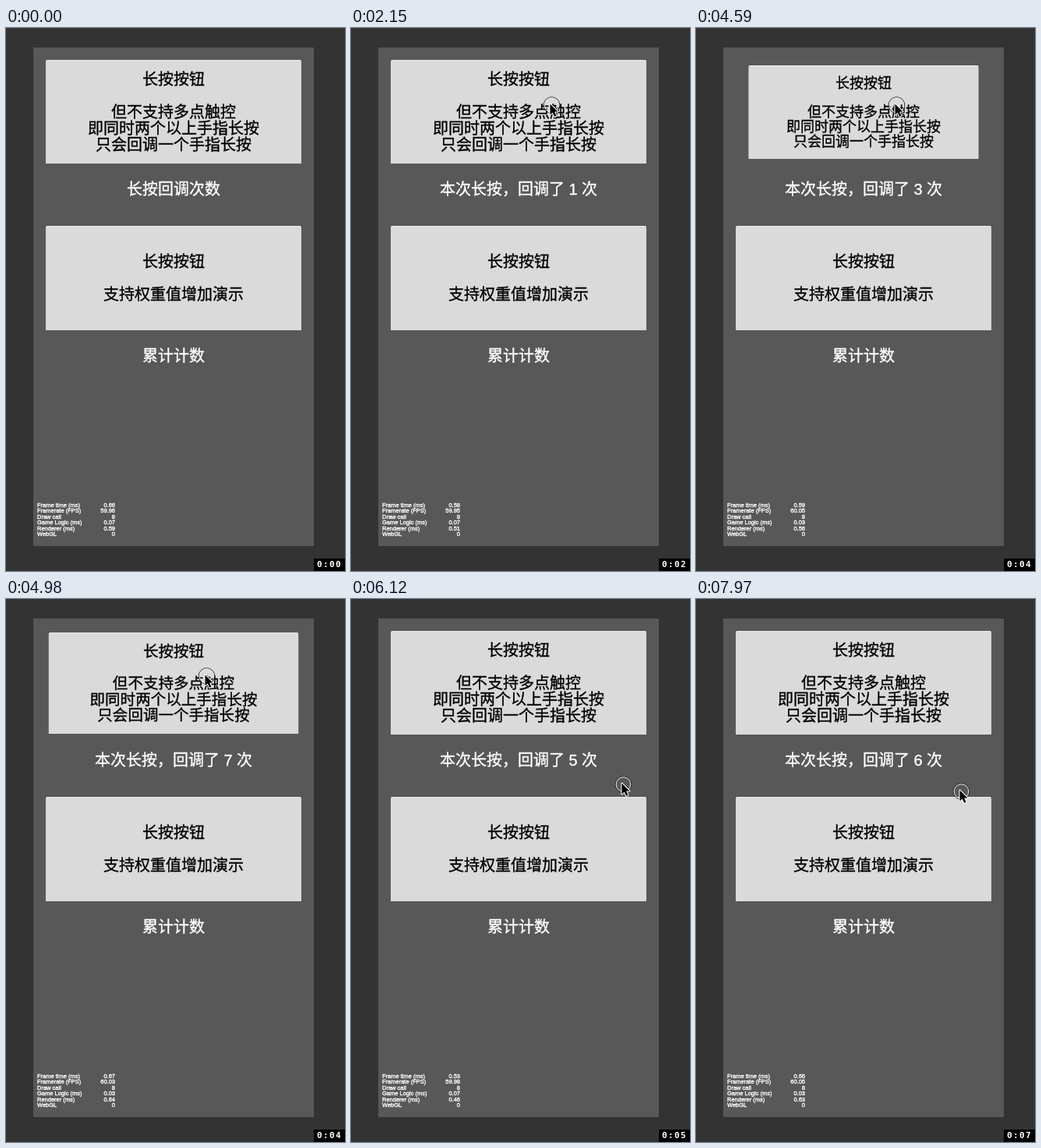
An HTML page with a canvas that plays this animation: 435x697 px, repeating every 8 s.

```html
<!DOCTYPE html>
<html lang="zh">
<head>
<meta charset="utf-8">
<title>长按按钮</title>
<style>
html, body { margin: 0; width: 100%; height: 100%; overflow: hidden; background: #333; }
canvas { display: block; width: 435px; height: 697px; }
</style>
</head>
<body>
<canvas id="stage" width="435" height="697"></canvas>
<script>
const ctx = document.getElementById('stage').getContext('2d');
const LOOP = 8000;
const SANS = '"Liberation Sans", "Noto Sans CJK SC", "Noto Sans CJK", sans-serif';
const MONO = '"DejaVu Sans Mono", monospace';

// Each hold shrinks the upper button and counts callbacks up to last.
const holds = [
  { down: 1510, up: 1750 },
  { down: 2990, up: 3490 },
  { down: 4390, up: 4904, step: 85, last: 7 },
  { down: 5230, up: 5840, step: 220, last: 5 },
  { down: 6780, up: 7153, first: 7100, step: 150, last: 6 }
];

// Pointer stops; it eases from one to the next.
const stops = [
  { at: 50, x: 396, y: 150 }, { at: 400, x: 275, y: 93 },
  { at: 1270, x: 257, y: 99 }, { at: 5680, x: 257, y: 99 },
  { at: 6120, x: 349, y: 238 }, { at: 6800, x: 335, y: 140 },
  { at: 7180, x: 335, y: 153 }, { at: 7600, x: 340, y: 247 }
];

const clamp = (v, lo = 0, hi = 1) => Math.min(hi, Math.max(lo, v));
const smooth = u => u * u * (3 - 2 * u);
const holdAt = t => holds.findLast(h => h.down <= t);

function noise(n) {
  const s = Math.sin(n * 12.9898) * 43758.5453;
  return s - Math.floor(s);
}

function text(str, x, y, color, size = 20, align = 'center') {
  ctx.font = size + 'px ' + SANS;
  ctx.textAlign = align;
  ctx.fillStyle = ctx.strokeStyle = color;
  ctx.lineWidth = 0.35;
  ctx.fillText(str, x, y);
  ctx.strokeText(str, x, y);
}

function pressScale(t) {
  const h = holdAt(t);
  if (!h) return 1;
  return 1 - 0.1 * (clamp((t - h.down) / 100) - clamp((t - h.up) / 100));
}

function callbackText(t) {
  const h = holdAt(t);
  if (!h) return '长按回调次数';
  const { first = h.down, step = 100, last = 1 } = h;
  const n = clamp(1 + Math.floor((t - first) / step), 1, last);
  return `本次长按，回调了 ${n} 次`;
}

// Lines are [text, offset of the glyph middle from the button centre].
function button(cy, h, scale, lines) {
  const w = 328 * scale;
  const top = Math.round(cy - h * scale / 2);
  const bottom = Math.round(cy + h * scale / 2);
  ctx.beginPath();
  ctx.roundRect(215 - w / 2, top, w, bottom - top, [2, 2, 0.5, 0.5]);
  ctx.fillStyle = '#dadada';
  ctx.fill();
  ctx.fillStyle = '#eee';
  ctx.fillRect(216 - w / 2, top, w - 2, 1);
  ctx.save();
  ctx.translate(215, cy);
  ctx.scale(scale, scale);
  for (const [str, dy] of lines) text(str, 0, dy + 7.3, '#000');
  ctx.restore();
}

// Readings jitter at random twice a second.
function profiler(t) {
  const k = Math.floor(t / 530) + 1;
  const frame = 0.5 + 0.17 * noise(k);
  const logic = noise(k + 40) < 0.5 ? 0.03 : 0.07;
  const rate = 59.88 + 0.18 * noise(k + 80);
  const rows = {
    'Frame time (ms)': frame,
    'Framerate (FPS)': rate,
    'Draw call': 8,
    'Game Logic (ms)': logic,
    'Renderer (ms)': frame - logic,
    'WebGL': 0
  };
  Object.entries(rows).forEach(([name, v], i) => {
    const y = 614.6 + i * 7.5;
    text(name, 40, y, '#fff', 7.5, 'left');
    text(String(+v.toFixed(2)), 140, y, '#fff', 7.5, 'right');
  });
}

function recClock(t) {
  ctx.fillStyle = '#000';
  ctx.fillRect(395, 681, 40, 16);
  ctx.font = 'bold 11px ' + MONO;
  ctx.textAlign = 'left';
  ctx.letterSpacing = '1.4px';
  ctx.fillStyle = '#fff';
  ctx.fillText('0:0' + Math.floor(t / 1032), 399, 692);
  ctx.letterSpacing = '0px';
}

function ring(r, color) {
  ctx.beginPath();
  ctx.arc(0, 0, r, 0, Math.PI * 2);
  ctx.strokeStyle = color;
  ctx.lineWidth = 1;
  ctx.stroke();
}

function pointer(t) {
  const i = stops.findLastIndex(s => s.at <= t);
  if (i < 0) return;
  const a = stops[i], b = stops[i + 1] || a;
  const e = smooth(clamp((t - a.at) / (b.at - a.at || 1)));
  ctx.save();
  ctx.translate(a.x + (b.x - a.x) * e + 0.5, a.y + (b.y - a.y) * e);
  ring(10.3, '#222');
  ring(9.3, '#eee');
  ctx.translate(-2, -1.5);
  ctx.beginPath();
  ctx.moveTo(0, 0);
  ctx.lineTo(0, 14);
  ctx.lineTo(3.2, 11);
  ctx.lineTo(5.6, 16.3);
  ctx.lineTo(8, 15.3);
  ctx.lineTo(5.7, 10);
  ctx.lineTo(10, 10);
  ctx.closePath();
  ctx.lineJoin = 'round';
  ctx.strokeStyle = '#fff';
  ctx.lineWidth = 2;
  ctx.stroke();
  ctx.fillStyle = '#000';
  ctx.fill();
  ctx.restore();
}

function draw(t) {
  ctx.fillStyle = '#333';
  ctx.fillRect(0, 0, 435, 697);
  ctx.fillStyle = '#585858';
  ctx.fillRect(35, 25, 360, 640);

  button(107.9, 133, pressScale(t), [
    ['长按按钮', -42], ['但不支持多点触控', 0],
    ['即同时两个以上手指长按', 21], ['只会回调一个手指长按', 42]
  ]);
  text(callbackText(t), 215, 214.3, '#fff');
  button(321, 134, 1, [['长按按钮', -21], ['支持权重值增加演示', 21]]);
  text('累计计数', 215, 427.5, '#fff');
  profiler(t);
  recClock(t);
  pointer(t);
}

const begin = performance.now();
function tick() {
  draw((performance.now() - begin) % LOOP);
  requestAnimationFrame(tick);
}
tick();
</script>
</body>
</html>
```
